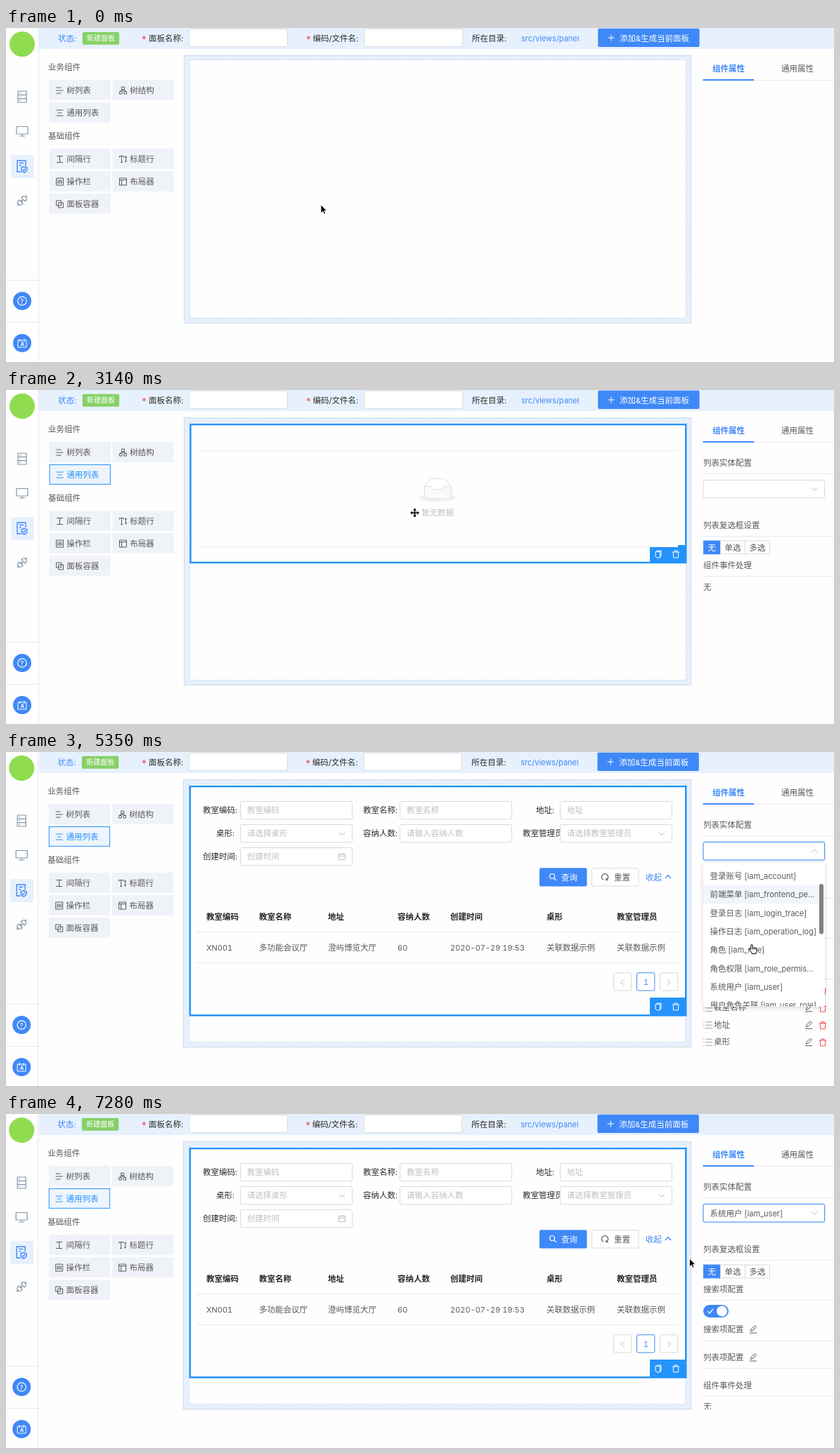
These frames come from a looping animation (1178 by 476 pixels, 8000 ms). An HTML page:

```html
<!DOCTYPE html>
<html lang="zh-CN">
<head>
<meta charset="utf-8">
<title>面板设计器</title>
<style>
html, body { margin: 0; width: 100%; height: 100%; overflow: hidden; background: #fefefe; }
svg { display: block; font-family: Inter, "Noto Sans CJK SC", "Noto Sans CJK", sans-serif; }
.icon { fill: none; stroke-width: 1; stroke-linejoin: round; }
.num { font-variant-numeric: tabular-nums; }
</style>
</head>
<body>
<svg id="stage" width="1178" height="476" viewBox="0 0 1178 476"></svg>
<script>
const BLUE = '#3f88f7', SKY = '#2593fc', INK = '#2b2b2b', GREY = '#595959', HINT = '#bfbfbf',
  EDGE = '#d9d9d9', RULE = '#e8e8e8', PALE = '#e7f1fe', RED = '#f5484d';
const CTRL = 26.3; // height of inputs, buttons and option rows

// yc is the vertical centre of the glyphs
const text = (x, yc, s, color = GREY, size = 11.5, weight = 400, latin = size - .5) =>
  `<text x="${x}" y="${yc + size * .37}" fill="${color}" font-size="${size}" font-weight="${weight}">` +
  s.replace(/[ -~]+/g, m => `<tspan font-size="${latin}">${m.replace('&', '&amp;')}</tspan>`) + '</text>';
const fill = (x, y, w, h, color, r = 0) =>
  `<rect x="${x}" y="${y}" width="${w}" height="${h}" rx="${r}" fill="${color}"/>`;
const box = (x, y, w, h, color, stroke, r = 2, extra = '') =>
  `<rect x="${x + .5}" y="${y + .5}" width="${w - 1}" height="${h - 1}" rx="${r}" fill="${color}" stroke="${stroke}" ${extra}/>`;
const rule = (x, y, w, color = RULE) => fill(x, y, w, 1, color);
const group = (id, body, attrs = '') => `<g id="${id}" ${attrs}>${body}</g>`;

const ICONS = {
  down: 'M-4-2 0 2.5 4-2', up: 'M-4 2 0-2.5 4 2', left: 'M2.5-4-2.5 0 2.5 4', right: 'M-2.5-4 2.5 0-2.5 4',
  plus: 'M-4.5 0H4.5M0-4.5V4.5',
  lines: 'M-5-4H2M-5 0H5M-5 4H2', center: 'M-5-4H5M-3 0H3M-5 4H5',
  tree: 'M-2-5H2V-1.5H-2ZM-5 1.5H-1.5V5H-5ZM1.5 1.5H5V5H1.5ZM0-1.5V0M-3.2 1.5V0H3.2V1.5',
  gap: 'M-4.5-4.5H4.5M-4.5 4.5H4.5M0-4.5V4.5M-2-4.5H2',
  title: 'M-5-2.5V-4.5H1V-2.5M-2-4.5V4.5M-3.5 4.5H-.5M4-4V4M2.5-2.5 4-4.2 5.5-2.5M2.5 2.5 4 4.2 5.5 2.5',
  tools: 'M-5-5H5V5H-5ZM-2.5-3V3M0-3V3M2.5-3V3M-3.5 1H-1.5M-1-1H1M1.5 1H3.5',
  layout: 'M-5-5H5V5H-5ZM-5-2.5H5M-2-2.5V5',
  stack: 'M-5-5H2V2H-5ZM-2-2H5V5H-2Z',
  server: 'M-6-8H6V8H-6ZM-6-2.7H6M-6 2.7H6M-3.5-5.3H-2M-3.5 0H-2M-3.5 5.3H-2',
  screen: 'M-8-6.5H8V4H-8ZM0 4V7M-4 7H4',
  form: 'M0 8H-6V-8H6V-1M-3-4.5H3M-3-1H0M4 .5 8 2V5Q7 8 4 9 1 8 0 5V2ZM2 4.5 3.5 6 6 3',
  plug: 'M-7 7-4.5 4.5M-4-1 1 4-1 6Q-4 7-5.5 5.5-7 4-6 1ZM4 1-1-4 1-6Q4-7 5.5-5.5 7-4 6-1ZM4.5-4.5 7-7M-2 1 0-1M-1 2 1 0',
  copy: 'M-2.5-5H4V3H2.5M-4-3.5H2.5V5H-2L-4 3Z',
  bin: 'M-5-3H5M-2-3V-5H2V-3M-3.8-3-3.3 5H3.3L3.8-3',
  edit: 'M-5 5H5M-3.5 2.5-3-.5 2.5-5.5 4.5-3.5-1 2Z',
  list: 'M-2.5-4.5H7M-2.5 0H7M-2.5 4.5H7M-6-4.5H-4.5M-6 0H-4.5M-6 4.5H-4.5',
  search: 'M-4.5-1A3.5 3.5 0 1 0 2.5-1 3.5 3.5 0 1 0-4.5-1M1.5 1.5 5 5',
  reload: 'M-2.2 4.2A4.6 4.6 0 1 1 2.2 4.2M2 1.8V4.5H4.6',
  date: 'M-4.5-3.5H4.5V4.5H-4.5ZM-4.5-.8H4.5M-2-5V-2.5M2-5V-2.5',
  check: 'M-4 0-1 3 4-3'
};
const icon = (name, x, y, color = GREY, w = 1) =>
  `<path class="icon" d="${ICONS[name]}" transform="translate(${x} ${y})" stroke="${color}" style="stroke-width:${w}"/>`;

const sidebar = fill(46, 0, 1, 476, RULE) + '<circle cx="23" cy="23" r="18" fill="#90dc50"/>' +
  fill(7, 181, 33, 33, PALE, 2) +
  icon('server', 23, 98, '#8296a8', 1.2) + icon('screen', 23, 147, '#8296a8', 1.2) +
  icon('form', 22, 197, BLUE, 1.4) + icon('plug', 23, 246, '#8296a8', 1.2) +
  rule(0, 359, 47) + rule(0, 419, 47) +
  [389, 449].map(y => `<circle cx="23" cy="${y}" r="13" fill="${BLUE}"/>`).join('') +
  '<circle cx="23" cy="389" r="6.2" fill="none" stroke="#fff" stroke-width="1.2"/>' +
  text(20.2, 389, '?', '#fff', 10) +
  '<path class="icon" stroke="#fff" d="M17 445H29V455H17ZM20 443V447M26 443V447"/>' + text(20.7, 450.2, 'A', '#fff', 7.5, 700);

const star = x => text(x, 16, '*', RED, 14);
const headLeft = text(74, 14.5, '状态:', BLUE) + fill(108.7, 5.8, 52.4, 18, '#87d068', 2) + text(115, 14.5, '新建面板', '#fff', 10);
const headRight = star(427) + text(436.5, 14.5, '编码/文件名:', INK) + box(509.3, .8, 140.6, CTRL, '#fff', EDGE) +
  text(663, 14.5, '所在目录:', INK) + text(733, 14.5, 'src/views/panel', BLUE) +
  fill(842.2, .8, 144.4, CTRL, BLUE, 2) + icon('plus', 861, 14, '#fff') + text(873, 14.5, '添加&生成当前面板', '#fff');

const tile = (x, y, name, label, color = GREY) => icon(name, x + 14.5, y + 15, color) + text(x + 24.3, y + 15, label, color);
const TILES = [
  [62, 74, 'lines', '树列表'], [152, 74, 'tree', '树结构'], [62, 106, 'center', '通用列表'],
  [62, 172, 'gap', '间隔行'], [152, 172, 'title', '标题行'], [62, 204, 'tools', '操作栏'],
  [152, 204, 'layout', '布局器'], [62, 236, 'stack', '面板容器']
];
const litTile = extra => box(61.6, 106, 87.3, 28.8, '#eef4fc', SKY, 0, extra) + tile(62, 106, 'center', '通用列表', SKY);
const palette = text(60, 56, '业务组件') + text(60, 154, '基础组件') +
  TILES.map(a => fill(a[0] - .4, a[1], 87.3, 28.8, '#f0f2fa') + tile(...a)).join('') +
  group('hover', litTile('stroke-dasharray="3 2"')) + group('active', litTile('')) +
  group('ghost', litTile('stroke-dasharray="3 2"'), 'transform="translate(37 11)" opacity=".25"');

const canvasAt = x => box(x, 39, 975 - x, 382, '#e6f0fc', '#cfdaea', 0) +
  box(x + 8, 45, 707, 369, '#fefefe', '#ccd9ea', 0, 'stroke-dasharray="3 2"');

// x, bottom: outer edges of the selection outline
const frame = (x, bottom) =>
  `<rect x="${x + 1.25}" y="49.05" width="${966 - x}" height="${bottom - 50.3}" fill="#fefefe" stroke="${SKY}" stroke-width="2.5"/>`;
const tools = y => icon('copy', 928, y, '#fff') + icon('bin', 953, y, '#fff');

const emptyList = frame(261.2, 247.2) + rule(272, 86, 684) + rule(272, 223, 684) +
  `<g transform="translate(588 125.5) scale(.8215)"><ellipse cx="32" cy="34" rx="32" ry="7" fill="#f2f2f2"/>
   <path d="M9 14 19 2Q20 1 21 1H43Q44 1 45 2L55 14V23H9Z" fill="#fff" stroke="${EDGE}"/>
   <path d="M9 14H20Q22 14 22.5 17 23 20 25 20H39Q41 20 41.5 17 42 14 44 14H55V32Q55 36 52 36H12Q9 36 9 32Z" fill="#fafafa" stroke="${EDGE}"/></g>` +
  text(591, 175, '暂无数据', HINT) + fill(916, 224, 51, 23, SKY) + fill(956, 221, 11, 4, SKY) + tools(234);

// label x, label, input x, row centre, placeholder, trailing icon
const FIELDS = [
  [280, '教室编码', 333, 83, '教室编码'], [508, '教室名称', 560, 83, '教室名称'], [754, '地址', 788, 83, '地址'],
  [299, '桌形', 333, 116, '请选择桌形', 'down'], [508, '容纳人数', 560, 116, '请输入容纳人数'],
  [735, '教室管理员', 788, 116, '请选择教室管理员', 'down'], [280, '创建时间', 333, 149, '创建时间', 'date']
];
const field = ([lx, label, x, y, hint, mark]) => text(lx, y, label + ':', INK) +
  box(x, y - 13, 160, CTRL, '#fff', EDGE) + text(x + 10, y, hint, HINT) + (mark ? icon(mark, x + 145, y, HINT) : '');
const COLUMNS = [
  [285, '教室编码', 'XN001'], [360, '教室名称', '多功能会议厅'], [458, '地址', '澄屿博览大厅'], [557, '容纳人数', '60'],
  [632, '创建时间', '2020-07-29 19:53'], [769, '桌形', '关联数据示例'], [869, '教室管理员', '关联数据示例']
];
const fullList = frame(260.6, 376.6) + FIELDS.map(field).join('') +
  fill(759, 165.2, 67.5, CTRL, BLUE, 2) + icon('search', 778, 178, '#fff', 1.2) + text(790, 178.5, '查询', '#fff') +
  box(833, 165.2, 67.5, CTRL, '#fff', EDGE) + icon('reload', 852, 178, GREY, 1.2) + text(865, 178.5, '重置') +
  text(910, 178.5, '收起', BLUE) + icon('up', 942, 178, BLUE, 1.2) +
  COLUMNS.map(([x, head, cell]) => text(x, 234.5, head, '#262626', 11.5, 600) + text(x, 279, cell)).join('') +
  rule(271, 256, 685) + rule(271, 300, 685) +
  box(864, 314.2, CTRL, CTRL, '#fff', EDGE) + icon('left', 877, 328, HINT) +
  box(897, 314.2, CTRL, CTRL, '#fff', BLUE) + text(907, 328, '1', BLUE, 11.5) +
  box(930, 314.2, CTRL, CTRL, '#fff', EDGE) + icon('right', 943, 328, HINT) +
  fill(916, 350, 51, 26, SKY) + tools(363);

const section = (label, y) => text(992, y, label) + rule(992, y + 15, 186);
const choice = (x, w, label, on) => box(x, 214.5, w, 19.8, on ? BLUE : '#fff', on ? BLUE : EDGE, 0) + text(x + 6.5, 224.5, label, on ? '#fff' : GREY);
const tabs = rule(992, 74, 186) + fill(991.5, 73, 72.5, 2, BLUE) +
  text(1005, 57.5, '组件属性', BLUE, 11.5, 600) + text(1103, 57.5, '通用属性');
const selectAt = color => box(991.6, 128.1, 173.4, CTRL, '#fff', color);
const selectBox = section('列表实体配置', 104) + selectAt(EDGE) +
  group('focus', box(991, 127.5, 174.6, 27.5, 'none', '#d3e5fd', 3, 'stroke-width="1.8"') + selectAt('#4b93f8')) +
  group('value', text(1001.5, 141.5, '系统用户 [iam_user]')) +
  `<g transform="translate(1150 141)">${group('chevron', icon('down', 0, 0, HINT))}</g>` +
  section('列表复选框设置', 193) + choice(1016, 36, '单选') + choice(1051, 36, '多选') + choice(992, 24, '无', true);
const searchPart = section('搜索项配置', 250) + fill(992, 272, 36, 18, BLUE, 9) +
  '<circle cx="1018.5" cy="281" r="7.5" fill="#fff"/>' + icon('check', 1002, 281, '#fff', 1.2) +
  text(992, 307, '搜索项配置') + icon('edit', 1063, 307) + rule(992, 323, 186);
const panelPlain = section('组件事件处理', 250) + text(992, 281, '无');
const panelRows = searchPart + ['教室编码', '教室名称', '地址', '桌形'].map((s, i) => {
  const y = 340.5 + i * 24.4;
  return icon('list', 998, y, '#a0a0a0') + text(1007, y - 1, s) + icon('edit', 1142, y) + icon('bin', 1162, y + .3, RED);
}).join('');
const panelDone = searchPart + section('列表项配置', 347) + icon('edit', 1063, 347) + section('组件事件处理', 386.5) + text(992, 417, '无');

const TOP = 161;
const OPTIONS = ['教室 [classroom]', '示例 [demo]', '数据字典 [dictionary]', '登录账号 [iam_account]',
  '前端菜单 [iam_frontend_pe...', '登录日志 [iam_login_trace]', '操作日志 [iam_operation_log]', '角色 [iam_role]',
  '角色权限 [iam_role_permis...', '系统用户 [iam_user]', '用户角色关联 [iam_user_role]', '子项1 [item_one]',
  '子项2 [item_two]', '月度计划 [monthly_plan]'];
const PICK = 9;
const dropdown = fill(992, 158.5, 173, 204.5, '#fff', 2).replace('/>', ' filter="url(#shade)"/>') +
  `<g clip-path="url(#listClip)">` + group('options',
    group('mark', fill(992, TOP, 173, CTRL, '#f0f6fc')) +
    OPTIONS.map((s, i) => group('opt' + i, text(1001.5, TOP + 13.2 + i * CTRL, s))).join('')) + '</g>' +
  group('thumb', fill(1157, TOP, 6, 71.5, '#808080', 3));

const POINTERS = {
  arrow: '<path d="M0 0V11.6L2.7 9.2 4.6 13.2 6.5 12.4 4.7 8.4H8.3Z" fill="#000" stroke="#fff" stroke-width=".8"/>',
  move: '<path d="M0-6.5 2.6-3.4H.8V-.8H3.4V-2.6L6.5 0 3.4 2.6V.8H.8V3.4H2.6L0 6.5-2.6 3.4H-.8V.8H-3.4V2.6L-6.5 0-3.4-2.6V-.8H-.8V-3.4H-2.6Z" fill="#000" stroke="#fff" stroke-width="1.4" paint-order="stroke"/>',
  hand: '<path d="M-1.2 1.2Q0-.6 1.2 1.2V5Q2.4 4 3.4 5.2 4.6 4.4 5.4 5.7 6.8 5.3 7 6.8V9.5Q6.8 11 6 12V13.5H0V12Q-2 9.5-4 7.3-3.2 5.7-1.2 7.5ZM1.2 5V7.5M3.4 5.2V7.5M5.4 5.7V7.5" fill="#fff" stroke="#000"/>'
};

const stage = document.getElementById('stage');
stage.innerHTML = `<defs><clipPath id="listClip"><rect x="992" y="159" width="173" height="203.5"/></clipPath>
  <clipPath id="panelClip"><rect x="980" y="0" width="198" height="421"/></clipPath>
  <filter id="shade" x="-10%" y="-10%" width="120%" height="120%"><feDropShadow dx="0" dy="1.5" stdDeviation="3" flood-opacity=".16"/></filter></defs>` +
  fill(47, 0, 1131, 30, PALE) +
  group('shifted', sidebar + headLeft + headRight + palette) +
  star(193) + text(203, 14.5, '面板名称:', INK) + box(260.3, .8, 140.6, CTRL, '#fff', EDGE) +
  group('wide', canvasAt(252)) + group('narrow', canvasAt(253)) +
  group('emptyList', emptyList) + group('fullList', fullList, 'class="num"') + tabs +
  `<g clip-path="url(#panelClip)">` + group('selectBox', selectBox) + group('plain', panelPlain) +
  group('rows', panelRows) + group('done', panelDone) + '</g>' +
  group('dropdown', dropdown) + Object.keys(POINTERS).map(k => group(k, POINTERS[k])).join('');

const CURSOR = [
  [0, 'arrow', 448, 252], [450, 'arrow', 445.5, 248.5], [750, 'arrow', 400, 226], [900, 'arrow', 265, 168],
  [1050, 'move', 128, 124], [1200, 'move', 108, 122], [2250, 'arrow', 369.5, 160], [2400, 'arrow', 470, 170],
  [2550, 'arrow', 540, 175], [2700, 'arrow', 572, 176], [2840, 'move', 579, 175], [3140, 'move', 581.5, 175],
  [3290, 'move', 800, 168], [3440, 'move', 880, 160], [3590, 'arrow', 975, 150], [3740, 'hand', 1010, 143],
  [3890, 'hand', 1019, 142.5], [4030, 'hand', 1022, 142.5], [4620, 'hand', 1022.5, 143.5], [4770, 'hand', 1034, 172],
  [4910, 'hand', 1050, 226], [5060, 'hand', 1061, 274], [5490, 'hand', 1061, 268], [5640, 'hand', 1058, 243],
  [5940, 'hand', 1054, 243], [6090, 'arrow', 985, 238], [6240, 'move', 870, 228], [6390, 'move', 811.5, 225.5],
  [6540, 'move', 809.5, 222.5], [7130, 'move', 890, 215], [7280, 'arrow', 972.5, 206]
];
const SCROLL = [[0, 0], [5200, 22], [5350, 76.3], [5490, 140], [5640, 163.7]];
const HOVER = [[0, 0], [4910, 2], [5060, 4], [5640, PICK]];
const TURN = [[0, 0], [4180, 180], [6390, 50], [6540, 0]];

// [id, from, to, ...second span]
const SPANS = [
  ['hover', 1050, 2840], ['ghost', 2250, 2400], ['active', 2840, 8000],
  ['narrow', 0, 3290], ['wide', 3290, 8000], ['emptyList', 2840, 3290], ['fullList', 3290, 8000],
  ['selectBox', 2840, 8000], ['plain', 2840, 3290, 5940, 6540], ['rows', 3290, 5940], ['done', 6540, 8000],
  ['focus', 4030, 8000], ['value', 5940, 8000], ['dropdown', 4180, 6540], ['thumb', 5200, 6540]
];

const el = id => document.getElementById(id);
const at = (table, t) => table.filter(r => r[0] <= t).pop();
const show = (id, on) => { el(id).style.display = on ? '' : 'none'; };
const place = (id, v) => el(id).setAttribute('transform', v);

function draw(t) {
  for (const [id, ...s] of SPANS) show(id, (t >= s[0] && t < s[1]) || (t >= s[2] && t < s[3]));
  place('shifted', `translate(${t < 3290 ? 0 : -.8} 0)`);
  const scroll = at(SCROLL, t)[1];
  place('options', `translate(0 ${-scroll})`);
  place('thumb', `translate(0 ${scroll * .353})`);
  place('mark', `translate(0 ${at(HOVER, t)[1] * CTRL})`);
  place('chevron', `rotate(${at(TURN, t)[1]})`);
  el('opt' + PICK).firstChild.setAttribute('font-weight', t < 5940 ? 400 : 600);
  const [, kind, x, y] = at(CURSOR, t);
  for (const k in POINTERS) show(k, k === kind);
  place(kind, `translate(${x} ${y})`);
}

const start = performance.now();
function tick() {
  draw((performance.now() - start) % 8000);
  requestAnimationFrame(tick);
}
tick();
</script>
</body>
</html>
```
